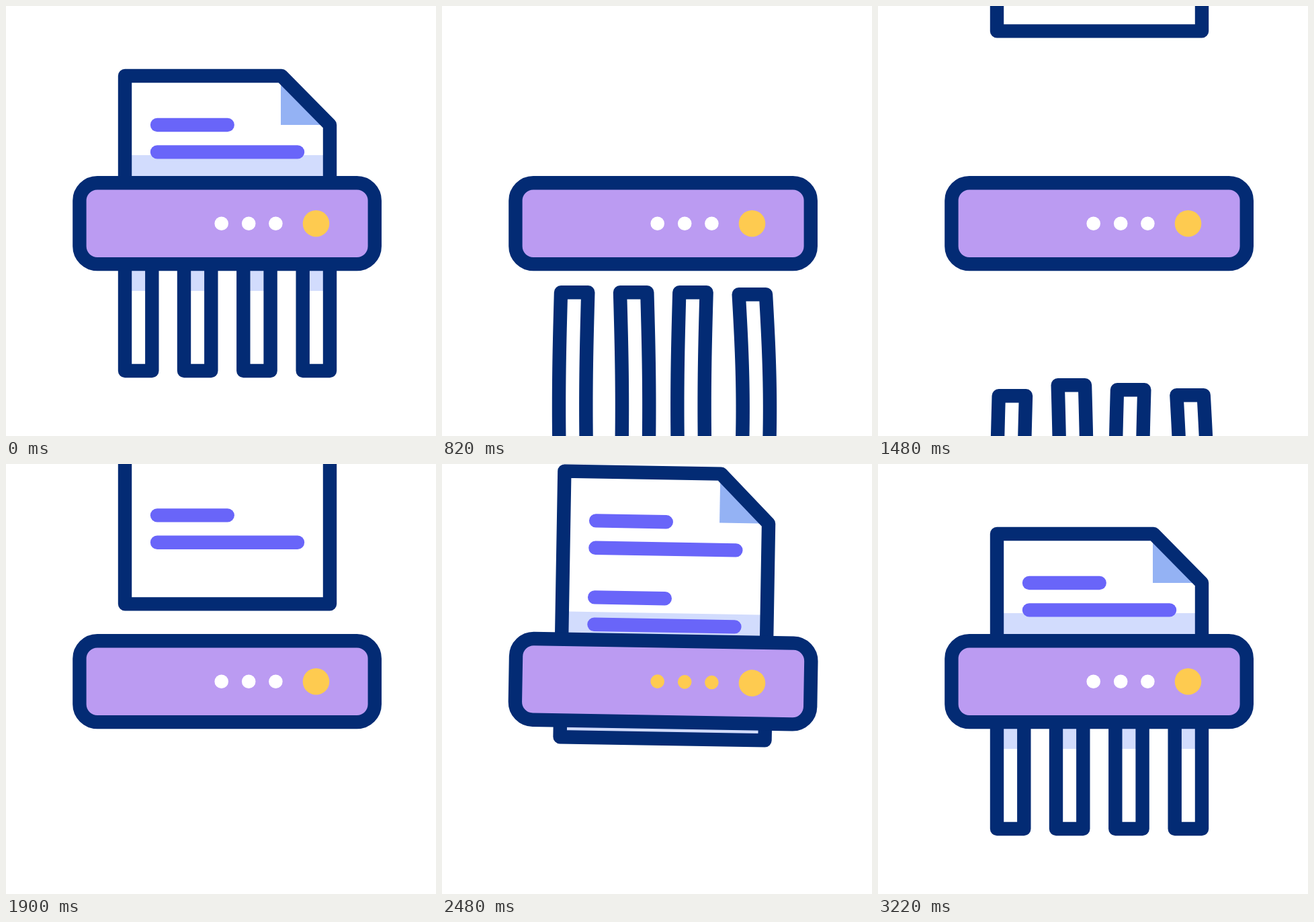
These frames come from a looping animation (640x640 px, 3.6 s). An HTML page with a canvas:

```html
<!DOCTYPE html>
<html lang="en">
<head>
<meta charset="utf-8">
<title>Paper shredder</title>
<style>
  html, body { margin: 0; width: 100%; height: 100%; overflow: hidden; background: #fff; }
  canvas { display: block; width: 640px; height: 640px; }
</style>
</head>
<body>
<canvas id="stage" width="640" height="640"></canvas>
<script>
const ctx = document.getElementById('stage').getContext('2d');
const LOOP = 3600;
const NAVY = '#032b74', PURPLE = '#bb9bf2', YELLOW = '#fecb50';
const INK = '#6965f9', FOLD = '#94b2f4', SHADE = '#d2dcfd';
const LEFT = 177, RIGHT = 482, MID_X = 329, MID_Y = 324, STROKE = 20.4;
const SPEED = 0.4075;

// x: left side, y0/y1: top edge at 820 and 1480 ms, bend: sideways bulge
const STRIPS = [
  { x: 177, y0: 426, y1: 580, bend: -3 },
  { x: 265, y0: 426, y1: 564, bend: 3 },
  { x: 353.3, y0: 426, y1: 571, bend: -3 },
  { x: 441.7, y0: 429, y1: 579, bend: 6 }
];

const clamp = (v, lo, hi) => Math.min(hi, Math.max(lo, v));

// Linear track through [time, value] pairs
function track(t, keys) {
  if (t <= keys[0][0]) return keys[0][1];
  for (let i = 1; i < keys.length; i++) {
    const [a, va] = keys[i - 1], [b, vb] = keys[i];
    if (t <= b) return va + (vb - va) * (t - a) / (b - a);
  }
  return keys[keys.length - 1][1];
}

function tilt(t) {
  if (t < 240 || t > 2920) return 0;
  const burst = (t - 240) % 360;
  return track(burst, [[0, 0], [32.5, -2], [97.5, 2], [130, 0]]) * Math.PI / 180;
}

function outline(path) {
  ctx.fillStyle = '#fff';
  ctx.fill(path);
  ctx.save();
  ctx.clip(path);
  ctx.fillStyle = SHADE;
  ctx.fillRect(150, 222, 360, 202);
  ctx.restore();
}

function strokePath(path) {
  ctx.strokeStyle = NAVY;
  ctx.lineWidth = STROKE;
  ctx.lineJoin = 'round';
  ctx.stroke(path);
}

function inkLine(y, end) {
  ctx.strokeStyle = INK;
  ctx.lineWidth = STROKE;
  ctx.lineCap = 'round';
  ctx.beginPath();
  ctx.moveTo(225, y);
  ctx.lineTo(end, y);
  ctx.stroke();
}

function inkPair(y) {
  inkLine(y, 329.7);
  inkLine(y + 40.4, 434);
}

function sheet(top, bottom, pairs) {
  const path = new Path2D();
  path.moveTo(LEFT, top);
  path.lineTo(410, top);
  path.lineTo(RIGHT, top + 73);
  path.lineTo(RIGHT, bottom);
  path.lineTo(LEFT, bottom);
  path.closePath();
  outline(path);
  ctx.fillStyle = FOLD;
  ctx.beginPath();
  ctx.moveTo(409, top);
  ctx.lineTo(409, top + 73);
  ctx.lineTo(RIGHT, top + 73);
  ctx.fill();
  pairs.forEach(inkPair);
  strokePath(path);
}

function strip(x, top, bottom, bend, shift) {
  const from = Math.max(top, 394);
  const end = Math.min(bottom, 690);
  const sway = y => shift + bend * Math.sin(Math.PI * Math.max(0, y - from) / 340);
  const path = new Path2D();
  const steps = 30;
  for (let i = 0; i <= steps; i++) {
    const y = top + (end - top) * i / steps;
    path.lineTo(x + sway(y), y);
  }
  for (let i = steps; i >= 0; i--) {
    const y = top + (end - top) * i / steps;
    path.lineTo(x + 40.3 + sway(y), y);
  }
  path.closePath();
  outline(path);
  strokePath(path);
}

function clipped(y, h, paint) {
  ctx.save();
  ctx.beginPath();
  ctx.rect(-100, y, 840, h);
  ctx.clip();
  paint();
  ctx.restore();
}

const above = paint => clipped(-200, MID_Y + 200, paint);
const below = paint => clipped(MID_Y, 500, paint);

function disc(x, y, r, color) {
  ctx.fillStyle = color;
  ctx.beginPath();
  ctx.arc(x, y, r, 0, Math.PI * 2);
  ctx.fill();
}

function machine(t) {
  ctx.beginPath();
  ctx.roundRect(109.4, 263.3, 439.4, 120.8, 26.5);
  ctx.fillStyle = PURPLE;
  ctx.fill();
  ctx.strokeStyle = NAVY;
  ctx.lineWidth = STROKE;
  ctx.stroke();
  const busy = t >= 2000 && t < 3220;
  for (const x of [320.7, 361.2, 401.4]) disc(x, 323.8, 10.3, busy ? YELLOW : '#fff');
  disc(461.5, 323.8, 19.8, YELLOW);
}

function leave(t) {
  const move = SPEED * Math.max(0, t - 240);
  const top = 104 + move;
  if (top < 340) above(() => sheet(top, 700, [top + 73, top + 187]));
  const grow = clamp((t - 240) / 580, 0, 1);
  const shift = 2.7 * clamp((t - 820) / 660, 0, 1);
  below(() => STRIPS.forEach(s => {
    const y = s.y0 + (s.y1 - s.y0) * (t - 820) / 660;
    const edge = t < 240 ? 300 : y;
    if (edge < 655) strip(s.x, edge, 543 + move, s.bend * grow, shift);
  }));
}

function enter(t) {
  const bottom = track(t, [[1300, -36], [1480, 37], [1900, 208], [2480, 408.5], [2920, 543]]);
  const left = Math.max(0, 2920 - t) / 1020;
  const top = 104 - 350 * Math.pow(left, 1.6);
  const pairs = [top + 73, top + 187, bottom - 132];
  if (t < 2520) {
    sheet(top, bottom, pairs);
  } else {
    above(() => sheet(top, 700, pairs));
    below(() => STRIPS.forEach(s => strip(s.x, 300, bottom, 0, 0)));
  }
}

function draw(t) {
  ctx.fillStyle = '#fff';
  ctx.fillRect(0, 0, 640, 640);
  ctx.save();
  ctx.translate(MID_X, MID_Y);
  ctx.rotate(tilt(t));
  ctx.translate(-MID_X, -MID_Y);
  if (t < 1900) leave(t);
  if (t >= 1300) enter(t);
  machine(t);
  ctx.restore();
}

const start = performance.now();
function tick() {
  draw((performance.now() - start) % LOOP);
  requestAnimationFrame(tick);
}
tick();
</script>
</body>
</html>
```
